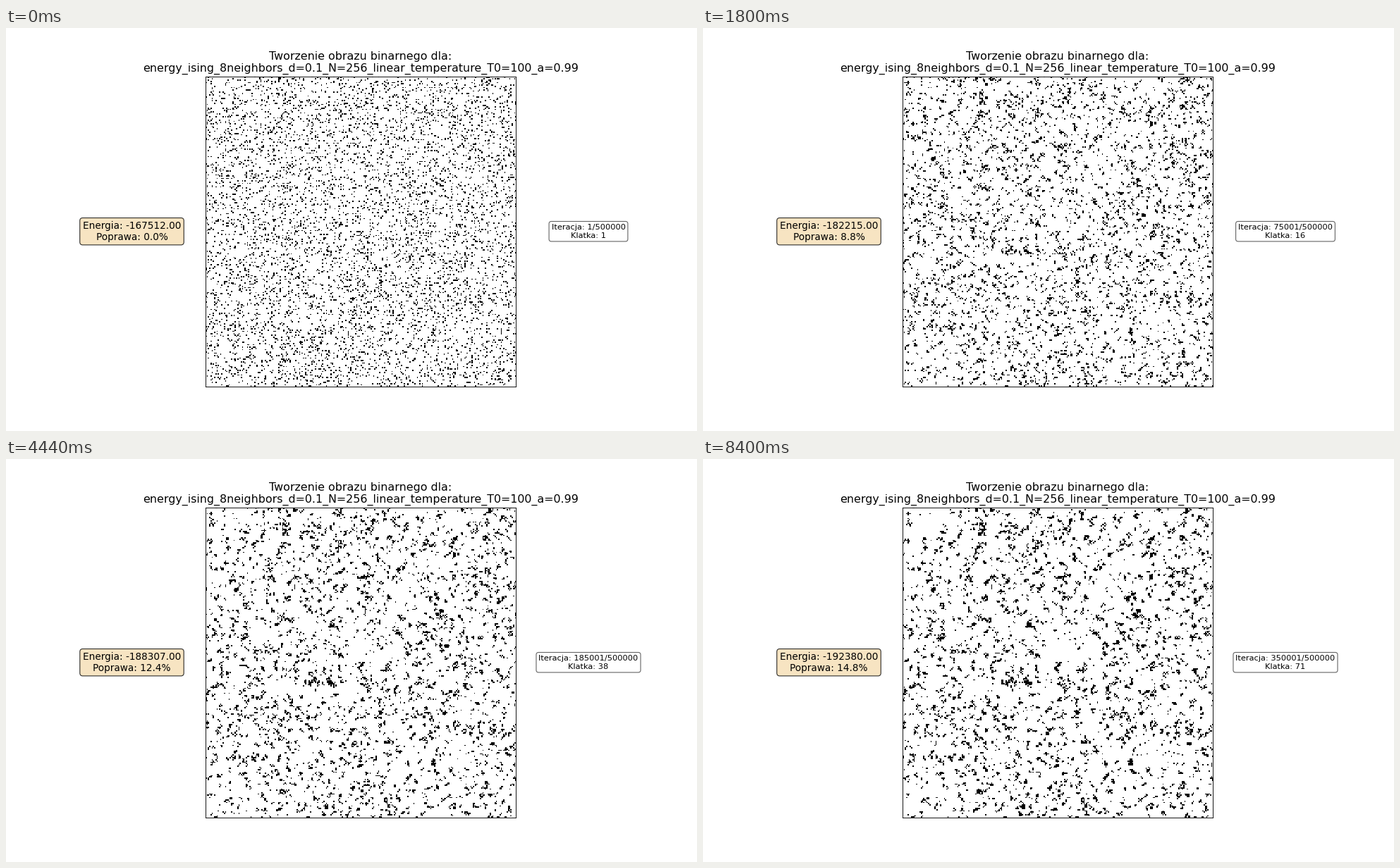
Recreate the animation shown at these times as a matplotlib script. Size 980 by 572 pixels, loop 8.52 s.

```python
import random

import matplotlib.pyplot as plt
import numpy as np
from matplotlib.animation import FuncAnimation

W, H, DPI = 980, 572, 80
PT = W / 12 / DPI            # type and line scale of a 12 inch wide layout
N, DENSITY = 256, 0.1
FRAMES, INTERVAL = 71, 120
STEP, TOTAL = 5000, 500000
E_START = -167512

plt.rcParams["font.family"] = "DejaVu Sans"


def energy_curve():
    """Energy per frame: roughly logarithmic descent through a few knots."""
    knots = np.array([0, 9, 15, 27, 37, 49, 70])
    values = [E_START, -179021, -182215, -186069, -188307, -190142, -192380]
    warp = lambda k: np.log1p(k / 5)
    return np.rint(np.interp(warp(np.arange(FRAMES)), warp(knots), values))


def neighbour_table():
    y, x = np.divmod(np.arange(N * N), N)
    shifts = [(a, b) for a in (-1, 0, 1) for b in (-1, 0, 1) if a or b]
    columns = [(y + a) % N * N + (x + b) % N for a, b in shifts]
    return np.stack(columns, axis=1)


def anneal(energies, max_tries=4000):
    """Swap black and white cells at zero temperature, one snapshot per frame."""
    rng = random.Random(11)
    table = neighbour_table()
    start = np.random.default_rng(11).random(N * N) < DENSITY
    count = start[table].sum(axis=1).tolist()
    near = table.tolist()
    black = np.flatnonzero(start).tolist()
    cells = bytearray(start.astype(np.uint8).tobytes())
    snapshots, gained = [], 0
    for energy in energies:
        wanted = E_START - energy
        for _ in range(max_tries):
            if gained >= wanted:
                break
            slot = int(rng.random() * len(black))
            src, dst = black[slot], int(rng.random() * N * N)
            if cells[dst]:
                continue
            gain = 4 * (count[dst] - (dst in near[src]) - count[src])
            if gain < 0:
                continue
            cells[src], cells[dst], black[slot] = 0, 1, dst
            for i in near[src]:
                count[i] -= 1
            for i in near[dst]:
                count[i] += 1
            gained += gain
        snapshots.append(np.array(cells, dtype=np.uint8).reshape(N, N))
    return snapshots


def label(x, size, face, alpha):
    box = dict(boxstyle="round", facecolor=face, alpha=alpha, linewidth=PT)
    return fig.text(x / W, 1 - 288.7 / H, "", fontsize=size * PT,
                    ha="center", va="center", bbox=box)


energies = energy_curve()
snapshots = anneal(energies)

fig = plt.figure(figsize=(W / DPI, H / DPI), dpi=DPI, facecolor="white")
side, left, top = 440.2, 282.6, 68.8
ax = fig.add_axes([left / W, 1 - (top + side) / H, side / W, side / H])
image = ax.imshow(snapshots[0], cmap="gray_r", vmin=0, vmax=1,
                  interpolation="nearest", aspect="auto")
ax.set_xticks([])
ax.set_yticks([])
for spine in ax.spines.values():
    spine.set_linewidth(0.8 * PT)
ax.set_title("Tworzenie obrazu binarnego dla:\n"
             "energy_ising_8neighbors_d=0.1_N=256_linear_temperature_T0=100_a=0.99",
             fontsize=14 * PT, pad=6 * PT)
energy_label = label(178.5, 12, "wheat", 0.8)
step_label = label(826, 10, "white", 0.6)


def update(k):
    energy = energies[k]
    better = (E_START - energy) / -E_START * 100
    image.set_data(snapshots[k])
    energy_label.set_text(f"Energia: {energy:.2f}\nPoprawa: {better:.1f}%")
    step_label.set_text(f"Iteracja: {k * STEP + 1}/{TOTAL}\nKlatka: {k + 1}")
    return image, energy_label, step_label


anim = FuncAnimation(fig, update, frames=FRAMES, interval=INTERVAL,
                     repeat=True, repeat_delay=0, blit=False)
plt.show()
```
